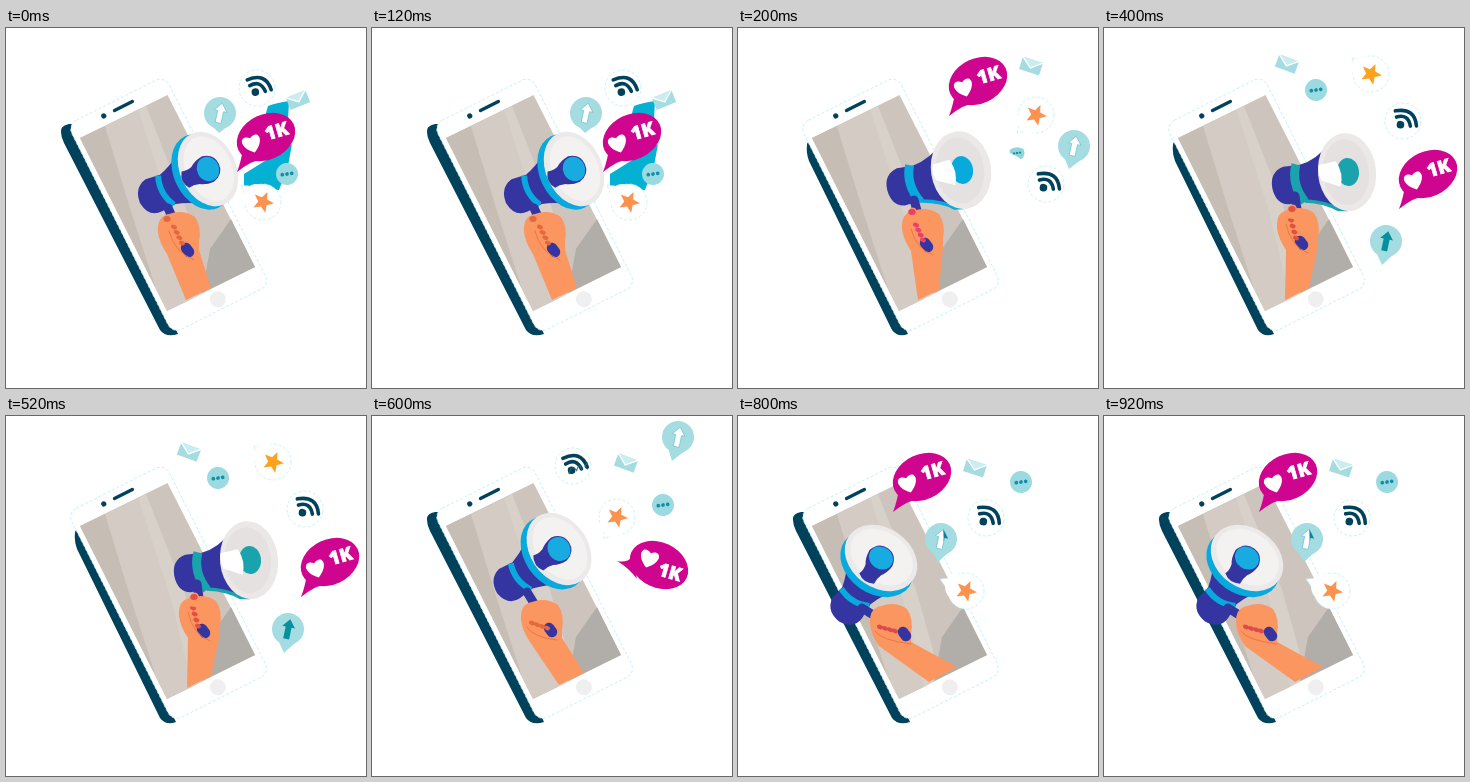
An HTML page that plays this animation: 360 px wide and 360 px high, repeating every 1000 ms.

```html
<!DOCTYPE html>
<html lang="en">
<head>
<meta charset="utf-8">
<title>Social media megaphone</title>
<style>
  html, body { margin: 0; width: 100%; height: 100%; overflow: hidden; background: #fff; }
  svg { display: block; width: 100vw; height: 100vh; }
  text { font: 800 18.5px "Open Sans", "Noto Sans", sans-serif; stroke: #fff; stroke-width: .7; }
  .edge { stroke: #b5edf0; stroke-width: .7; stroke-dasharray: 3 2; }
</style>
</head>
<body>
<svg id="stage" viewBox="0 0 360 360"></svg>
<script>
const NAVY = '#00425c', BLUE = '#3435a0', CYAN = '#08a9dd', TEAL = '#19a3ad',
      PINK = '#d0058f', PALE = '#a4dce1', SKIN = '#fb9660';
const STEP = 200;

// Positions are stage pixels, angles are degrees.
const poses = [
  { bell: [202, 141], tilt: -25, rx: 28, hand: [173, 206], arm: [180, 272, 205, 260],
    handle: [162, 180, 182, 223], nails: [168, 199, 176, 215], thumb: [161, 191], nail: '#e2683f',
    pink: [260, 109], rss: [251, 60, -5], star: [257, 174, -22, -17], mail: [292, 72, -22],
    chat: [281, 146, 11], arrow: [214, 85, -1, 20], arrowFill: '#fff', splash: true },
  { bell: [224, 142], tilt: -9, rx: 30, open: true, hand: [185, 203], arm: [180, 272, 201, 262],
    handle: [176, 172, 189, 218], nails: [178, 197, 185, 212], thumb: [174, 184], nail: '#e8406a',
    pink: [240, 53], rss: [308, 156, 8], star: [298, 87, -19, 18], mail: [293, 38, 18],
    chat: [279, 125, 7], arrow: [336, 118, -5, 23], arrowFill: '#fff', slim: true },
  { bell: [244, 144], tilt: -6, rx: 29, open: true, accent: TEAL, hand: [194, 202], arm: [181, 272, 205, 260],
    handle: [191, 168, 198, 216], nails: [187, 192, 192, 210], thumb: [188, 181], nail: '#e2503f',
    pink: [324, 146], rss: [299, 93, 8], star: [267, 46, -19, -16], starFill: '#fca21f', mail: [183, 36, 20],
    chat: [212, 62, 11], arrow: [282, 213, -4, 24], arrowFill: '#07909b', slim: true },
  { bell: [187, 133], tilt: -34, rx: 29, hand: [170, 206], arm: [187, 269, 212, 257],
    handle: [155, 176, 179, 215], nails: [160, 207, 175, 212], nail: '#e2683f',
    pink: [287, 149], flip: true, rss: [201, 50, -8], mark: true, star: [245, 101, -13, 22], mail: [254, 47, 20],
    chat: [291, 89, 11], arrow: [306, 21, -6, 24], arrowFill: '#fff' },
  { bell: [143, 142], tilt: -55, rx: 30, hand: [153, 210], arm: [191, 266, 219, 251],
    handle: [124, 192, 167, 219], nails: [142, 211, 157, 215], nail: '#dc4a4f',
    pink: [184, 61], rss: [248, 102, 10], star: [228, 175, -26, -12], mail: [237, 52, 18],
    chat: [283, 66, 11], arrow: [203, 123, -3, 23], arrowFill: '#fff', half: true }
];

const path = (d, fill, extra = '') => `<path d="${d}" fill="${fill}" ${extra}/>`;
const oval = (x, y, rx, ry, fill, extra = '') =>
  `<ellipse cx="${x}" cy="${y}" rx="${rx}" ry="${ry}" fill="${fill}" ${extra}/>`;
const dot = (x, y, r, fill, extra) => oval(x, y, r, r, fill, extra);
const line = (d, color, w, cap = 'round') =>
  `<path d="${d}" fill="none" stroke="${color}" stroke-width="${w}" stroke-linecap="${cap}"/>`;
const at = (x, y, turn, body) => `<g transform="translate(${x} ${y}) rotate(${turn})">${body}</g>`;

function phone(p) {
  const side = p.slim
    ? 'M69 117 Q69 113 74 114 L170 306 Q160 310 154 302 L71 133 Q68 125 69 117Z'
    : 'M55 104 Q54 98 63 96 L74 96 L172 306 Q160 310 154 302 L58 115 Q55 109 55 104Z';
  const screen = 'M74 110 L161.5 67 L249 239 L161 283Z';
  return path(side, NAVY) +
    at(161.7, 175, -26.7, `<rect x="-54.5" y="-115" width="109" height="234" rx="10" fill="#fff" class="edge"/>` +
      line('M-6 -106.5 H14', NAVY, 3.4) + dot(-18, -106.5, 2.6, NAVY) + dot(1.5, 108.5, 8, '#efefef')) +
    path(screen, '#cdc5bd') +
    path('M74 110 L99 98 L124 180 L150 261Z', '#c6bdb5') +
    path('M99 98 L132 82 L165 184 L186 271 L161 283 L150 261 L124 180Z', '#d3cbc4') +
    path('M132 82 L140 78 L178 174 L203 262 L186 271 L165 184Z', '#d8d1ca') +
    path('M225 191 L249 239 L196 265 L204 221Z', '#b1ada8');
}

function horn(p) {
  const accent = p.accent || CYAN, rx = p.rx;
  const [x, y] = p.bell;
  if (p.open) return at(x, y, p.tilt,
    path('M-64 -12 Q-78 -8 -77 8 Q-75 25 -62 26 L-46 24 Q-22 28 -8 38 L-14 -32 Q-30 -15 -48 -12Z', BLUE) +
    line('M-51 -13 Q-58 6 -46 25', accent, 9, 'butt') +
    path('M-49 22 Q-24 25 -4 39 L-14 38 Q-26 29 -46 26Z', accent) +
    oval(-1, 0, rx, 39, '#ebe8e7') + oval(-2, 0, rx - 6, 33, '#e5e1e1') +
    oval(0, 0, 11, 14, accent) +
    path('M-28 -10 L-11 -12 Q-4 1 -9 14 L-27 6 Q-31 -2 -28 -10Z', '#fff'));
  return at(x, y, p.tilt,
    path('M-61 -17 Q-75 -14 -76 2 Q-74 19 -60 19 L-44 18 Q-24 24 -10 38 L-10 -38 Q-22 -22 -46 -15Z', BLUE) +
    line('M-48 -15 Q-55 2 -46 18', accent, 6, 'butt') +
    oval(-7, 0, rx, 39.5, accent) + oval(0, 0, rx, 39, '#ebe9e9') +
    oval(1, 0, rx - 5, 34, '#f3f2f1') +
    path('M0 -14 Q-9 -13 -14 -9 Q-20 -7 -25 -9 Q-31 0 -25 9 Q-20 8 -14 10 Q-8 14 0 14 Q12 11 12 0 Q12 -11 0 -14Z', BLUE) +
    oval(0, 0, 11, 12.5, '#17abe0'));
}

function hand(p) {
  const [x, y] = p.hand, [lx, ly, rx, ry] = p.arm, [hx, hy, ex, ey] = p.handle;
  const [ax, ay, bx, by] = p.nails;
  let s = line(`M${hx} ${hy} L${ex} ${ey}`, BLUE, 9);
  s += path(`M${x - 21} ${y - 2} Q${x - 22} ${y - 18} ${x - 10} ${y - 20} Q${x + 4} ${y - 25} ${x + 16} ${y - 17}
    Q${x + 23} ${y - 7} ${x + 20} ${y + 8} L${x + 20} ${y + 16} L${rx} ${ry} L${lx} ${ly}
    L${x - 12} ${y + 20} Q${x - 20} ${y + 8} ${x - 21} ${y - 2}Z`, SKIN);
  s += line(`M${ex - 2} ${ey - 3} L${ex + 1} ${ey + 1}`, BLUE, 10.5);
  s += line(`M${ax - 5} ${ay + 4} Q${ax} ${by + 9} ${ex + 6} ${ey + 9}`, '#e87845', 1);
  for (let i = 0; i < 4; i++)
    s += at(ax + (bx - ax) * i / 3, ay + (by - ay) * i / 3, 25, oval(0, 0, 3.1, 2.1, p.nail));
  if (p.thumb) s += path(`M${p.thumb[0] - 7} ${p.thumb[1] + 9} Q${p.thumb[0] - 4} ${p.thumb[1] - 7}
    ${p.thumb[0] + 3} ${p.thumb[1] - 4} Q${p.thumb[0] + 8} ${p.thumb[1]} ${p.thumb[0] + 2} ${p.thumb[1] + 10}Z`, SKIN) +
    oval(...p.thumb, 3.6, 3, p.nail);
  return s;
}

function likes(p) {
  const k = p.flip ? 1 : -1;
  const heart = 'M0 9 C-15 -1 -9 -13 0 -6 C9 -13 15 -1 0 9Z';
  const tail = p.flip ? 'M-42 -4 Q-30 3 -22 14 L-27 -8 Q-32 -2 -42 -4Z' : 'M-29 35 Q-24 22 -23 10 L0 21 Q-14 23 -29 35Z';
  const [hx, hy, tx, ty] = p.flip ? [-10, -6, 11, 7] : [-14, 7, 10.5, -6];
  return at(...p.pink, 0, path(tail, PINK) + at(0, 0, 25 * k, oval(0, 0, 30.5, 22.5, PINK)) +
    at(hx, hy, 18 * k, path(heart, '#fff')) +
    at(tx, ty, 16 * k, '<text y="6.5" text-anchor="middle" fill="#fff">1K</text>'));
}

function rss(p) {
  return at(...p.rss, dot(0, 0, 18, '#fff', 'class="edge"') + dot(-2, 4, 3.8, NAVY) +
    line('M-7 -3 Q4 -8 8 4', NAVY, 3.6) + line('M-9 -9 Q10 -15 14 3', NAVY, 3.6) +
    (p.mark ? line('M-5 7 Q-1 -3 3 5 Q7 -4 8 5 M15 -1 Q9 2 14 5', '#35607d', 1) : ''));
}

function star(p) {
  const [x, y, tx, ty] = p.star;
  let d = '';
  for (let i = 0; i < 10; i++) {
    const r = i % 2 ? 4.8 : 11, a = i * Math.PI / 5 - 1.15;
    d += (i ? 'L' : 'M') + (r * Math.cos(a)).toFixed(2) + ' ' + (r * Math.sin(a)).toFixed(2);
  }
  const nx = -ty * .3, ny = tx * .3;
  return at(x, y, 0, path(`M${tx} ${ty} L${tx * .5 + nx} ${ty * .5 + ny} L${tx * .5 - nx} ${ty * .5 - ny}Z`, '#fff', 'class="edge"') +
    dot(0, 0, 18, '#fff', 'class="edge"') + dot(tx * .3, ty * .3, 13, '#fff') +
    path(d + 'Z', p.starFill || '#fb934f'));
}

const mail = p => at(...p.mail, path('M-10.5 -6.5 H10.5 V6.5 H-10.5Z', PALE) +
  path('M-10.5 -6.5 H10.5 L0 2Z', '#c9edf0') + line('M-10.5 -6.5 L0 2 L10.5 -6.5', '#fff', 1.3));

function chat(p) {
  const [x, y, r] = p.chat;
  return at(x, y, -8, (r < 9
    ? path('M-7 -4 Q0 -8 7 -3 Q9 4 3 7 Q0 3 -7 -1Z', '#91d5dc')
    : dot(0, 0, r, '#9bdae0')) +
    [-1, 0, 1].map(i => dot(i * r * .43, 0, r * .17, '#158da9')).join(''));
}

function arrow(p) {
  const [x, y, tx, ty] = p.arrow;
  const shape = 'M0 -11 L6.5 -3 L3 -3 L3 9 L-3 9 L-3 -3 L-6.5 -3Z';
  return at(x, y, 0, path(`M${tx} ${ty} L-10 11 L8 13Z`, PALE) + dot(0, 0, 16, PALE) +
    at(0, 1, 12, path(shape, p.arrowFill, p.arrowFill === '#fff' ? 'stroke="#69c3cb" stroke-width=".7"' : '') +
      (p.half ? path('M0 -11 L6.5 -3 L3 -3 L3 1Z', '#087f9e') : '')));
}

const splash = path('M262 78 Q270 75 283 73 L282 92 L258 92Z' +
  'M238 146 L286 116 L282 138 L273 162 L238 160Z', '#05b1d2');

const draw = p => phone(p) + horn(p) + hand(p) + (p.splash ? splash : '') +
  rss(p) + star(p) + mail(p) + arrow(p) + likes(p) + chat(p);

const stage = document.getElementById('stage');
stage.innerHTML = poses.map(p => `<g visibility="hidden">${draw(p)}</g>`).join('');
const scenes = [...stage.children];
let shown = -1;

function show(t) {
  const i = Math.floor(t / STEP) % scenes.length;
  if (i !== shown) {
    scenes.forEach((g, n) => g.setAttribute('visibility', n === i ? 'visible' : 'hidden'));
    shown = i;
  }
}

show(0);
const start = performance.now();
(function tick() {
  show(performance.now() - start);
  requestAnimationFrame(tick);
})();
</script>
</body>
</html>
```
